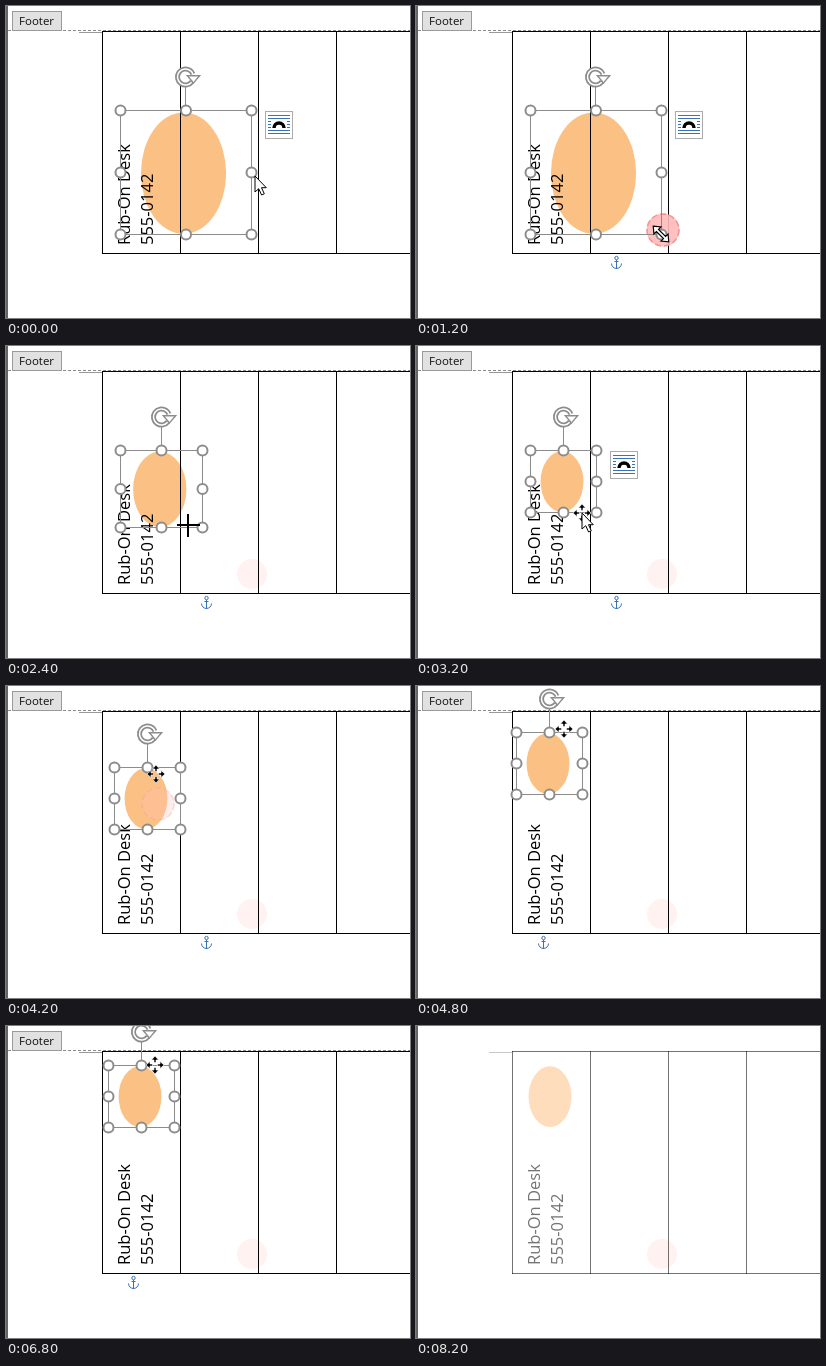
An HTML page with a canvas for the animation above (8800 ms loop, 404 by 312 pixels).

```html
<!DOCTYPE html>
<html lang="en">
<head>
<meta charset="utf-8">
<title>Resizing and moving a picture</title>
<style>
  html, body { margin: 0; width: 100%; height: 100%; overflow: hidden; background: #fff; }
  canvas { display: block; }
</style>
</head>
<body>
<canvas id="stage" width="404" height="312"></canvas>
<script>
const ctx = document.getElementById('stage').getContext('2d');
const LOOP = 8800, STEP = 200, TAU = Math.PI * 2;
const GRAY = '#8c8c8c', BLUE = '#3a72b8';
const FONT = '"Open Sans", "Noto Sans", sans-serif';

const ramp = (t, start, end) => Math.min(1, Math.max(0, (t - start) / (end - start)));

// The picture shrinks from its corner, is dragged up, then nudged into place.
function pictureAt(t) {
  const drag = ramp(t, 3800, 4800);
  const w = Math.round(131 - 65 * ramp(t, 1200, 2800));
  return {
    x: Math.round(114 - 14 * drag + 2 * ramp(t, 4800, 5600)),
    y: Math.round(104 - 58 * drag - 7 * ramp(t, 4800, 5600)),
    w, h: Math.round(w * .945)
  };
}

function cursorAt(t) {
  let x = 249, y = 170;
  const go = (start, end, toX, toY) => {
    const p = ramp(t, start, end);
    x += (toX - x) * p;
    y += (toY - y) * p;
  };
  go(0, 800, 245, 228);
  go(1200, 2700, 166, 167);
  go(3200, 3600, 152, 118);
  go(3800, 4800, 148, 43);
  go(4800, 5600, 149, 39);
  go(7400, 7600, 84, 65);
  return [Math.round(x), Math.round(y)];
}

function cursorKind(t) {
  if (t < 800) return arrowCursor;
  if (t < 1400) return resizeCursor;
  if (t < 3000) return crossCursor;
  if (t >= 7600) return arrowCursor;
  return t >= 4000 && t < 7000 ? moveCursor : hoverCursor;
}

function line(color, width, x1, y1, x2, y2) {
  ctx.beginPath();
  ctx.moveTo(x1, y1);
  ctx.lineTo(x2, y2);
  ctx.strokeStyle = color;
  ctx.lineWidth = width;
  ctx.stroke();
}
function arc(x, y, r, color, width, from = 0, to = TAU) {
  ctx.beginPath();
  ctx.arc(x, y, r, from, to);
  ctx.strokeStyle = color;
  ctx.lineWidth = width;
  ctx.stroke();
}
function disc(x, y, r, color) {
  ctx.beginPath();
  ctx.arc(x, y, r, 0, TAU);
  ctx.fillStyle = color;
  ctx.fill();
}
function shape(path, fill, stroke, width = 1) {
  const outline = new Path2D(path);
  ctx.fillStyle = fill;
  ctx.fill(outline);
  ctx.strokeStyle = stroke;
  ctx.lineWidth = width;
  ctx.stroke(outline);
}
function box(x, y, w, h, fill, stroke) {
  ctx.fillStyle = fill;
  ctx.fillRect(x, y, w, h);
  ctx.strokeStyle = stroke;
  ctx.lineWidth = 1;
  ctx.strokeRect(x + .5, y + .5, w - 1, h - 1);
}
function at(x, y, angle, draw) {
  ctx.save();
  ctx.translate(x, y);
  ctx.rotate(angle);
  draw();
  ctx.restore();
}
function label(text, size, color) {
  ctx.fillStyle = color;
  ctx.font = `${size}px ${FONT}`;
  ctx.fillText(text, 0, 0);
}

function drawTable() {
  line('#999', 1, 73, 26.5, 96, 26.5);
  line('#000', 1, 96, 25.5, 404, 25.5);
  line('#000', 1, 96, 247.5, 404, 247.5);
  for (let x = 96.5; x < 404; x += 78) line('#000', 1, x, 25, x, 248);
}

function drawText() {
  ['Rub-On Desk', '555-0142'].forEach((text, i) =>
    at(124 + 23 * i, 239, -Math.PI / 2, () => label(text, 16.5, '#000')));
}

function drawFooterTab() {
  ctx.setLineDash([3, 2]);
  line('#8a8a8a', 1, 2, 24.5, 404, 24.5);
  ctx.setLineDash([]);
  box(6, 5, 50, 20, '#e1e1e1', '#9a9a9a');
  at(13, 19, 0, () => label('Footer', 11.5, '#111'));
}

function drawPicture({ x, y, w, h }) {
  ctx.beginPath();
  ctx.ellipse(x + w * .485, y + h * .51, w * .325, h * .49, 0, 0, TAU);
  ctx.fillStyle = '#fbc184';
  ctx.fill();
}

function drawRotateHandle() {
  const arrow = 'M2.5 -1H13.5L8 5.5Z';
  disc(0, 0, 9, '#fff');
  arc(0, 0, 8, GRAY, 5, .6, 5.9);
  shape(arrow, GRAY, GRAY, 2);
  arc(0, 0, 8, '#fff', 1.5, .7, 5.9);
  shape(arrow, '#fff', GRAY);
}

function drawSelection({ x, y, w, h }) {
  const middle = Math.floor(x + w / 2) + .5;
  ctx.strokeStyle = GRAY;
  ctx.lineWidth = 1;
  ctx.strokeRect(x + .5, y + .5, w, h);
  line(GRAY, 1, middle, y, middle, y - 24);
  at(middle, y - 33, 0, drawRotateHandle);

  for (let i = 0; i < 9; i++) {
    if (i === 4) continue;
    const hx = x + .5 + w * (i % 3) / 2, hy = y + .5 + h * Math.floor(i / 3) / 2;
    disc(hx, hy, 5, '#fff');
    arc(hx, hy, 5, GRAY, 2);
  }
}

function drawLayoutButton() {
  box(0, 0, 28, 28, '#fff', '#ababab');
  for (let row = 0; row < 7; row++) {
    const y = 4.5 + row * 3;
    const beside = row > 1 && row < 5;
    line(BLUE, 1, 3, y, beside ? 6 : 25, y);
    if (beside) line(BLUE, 1, 22, y, 25, y);
  }
  arc(14, 17, 5, '#000', 3.5, Math.PI, TAU);
}

function drawAnchor() {
  arc(0, -4, 1.7, BLUE, 1);
  line(BLUE, 1, 0, -2, 0, 7);
  line(BLUE, 1, -2, -.5, 2, -.5);
  arc(0, 1.5, 5, BLUE, 1, 0, Math.PI);
}

function drawClick(x, y, alpha) {
  ctx.globalAlpha = alpha;
  disc(x, y, 16.5, '#ffbaba');
  ctx.setLineDash([6, 3]);
  arc(x, y, 16, '#f58b8b', 1.5);
  ctx.setLineDash([]);
  ctx.globalAlpha = 1;
}

function arrowCursor() {
  shape('M0 0V16L3.7 12.7L6.6 19L9.3 17.8L6.5 11.7H11.3Z', '#fff', '#000');
}
function resizeCursor() {
  at(0, 0, Math.PI / 4, () =>
    shape('M-11 0l6-5v3.5h10v-3.5l6 5l-6 5v-3.5h-10v3.5z', '#fff', '#000', 1.2));
}
function crossCursor() {
  line('#000', 2, -11, 0, 12, 0);
  line('#000', 2, 0, -11, 0, 12);
}
function moveCursor() {
  for (let i = 0; i < 4; i++)
    at(0, 0, i * TAU / 4, () => shape('M9 0L5 -3.5V-1H2.5V1H5V3.5Z', '#000', '#fff', .6));
}
function hoverCursor() {
  moveCursor();
  arrowCursor();
}

function draw(t) {
  const picture = pictureAt(t);
  const editing = t < 8200, selected = t < 8000;

  ctx.fillStyle = '#fff';
  ctx.fillRect(0, 0, 404, 312);
  if (t >= 1400) disc(246, 228, 15, '#fff2f0');

  ctx.globalAlpha = editing ? 1 : .55;
  if (editing) drawFooterTab();
  drawPicture(picture);
  drawTable();
  drawText();
  ctx.globalAlpha = 1;
  ctx.fillStyle = '#666';
  ctx.fillRect(0, 0, 2, 312);

  if (t >= 1000) drawClick(247, 224, .9 * (1 - ramp(t, 1200, 1800)));
  if (t >= 3600) drawClick(152, 118, .8 * (1 - ramp(t, 3800, 4400)));
  if (!selected) return;

  drawSelection(picture);
  if (t >= 200) at(t < 4400 ? 200.5 : 127.5, 256, 0, drawAnchor);
  if (t < 1400 || (t >= 3000 && t < 4000) || t >= 7400)
    at(picture.x + picture.w + 14, picture.y + 1, 0, drawLayoutButton);
  at(...cursorAt(t), 0, cursorKind(t));
}

function tick() {
  draw(Math.floor(performance.now() % LOOP / STEP) * STEP);
  requestAnimationFrame(tick);
}
tick();
</script>
</body>
</html>
```
